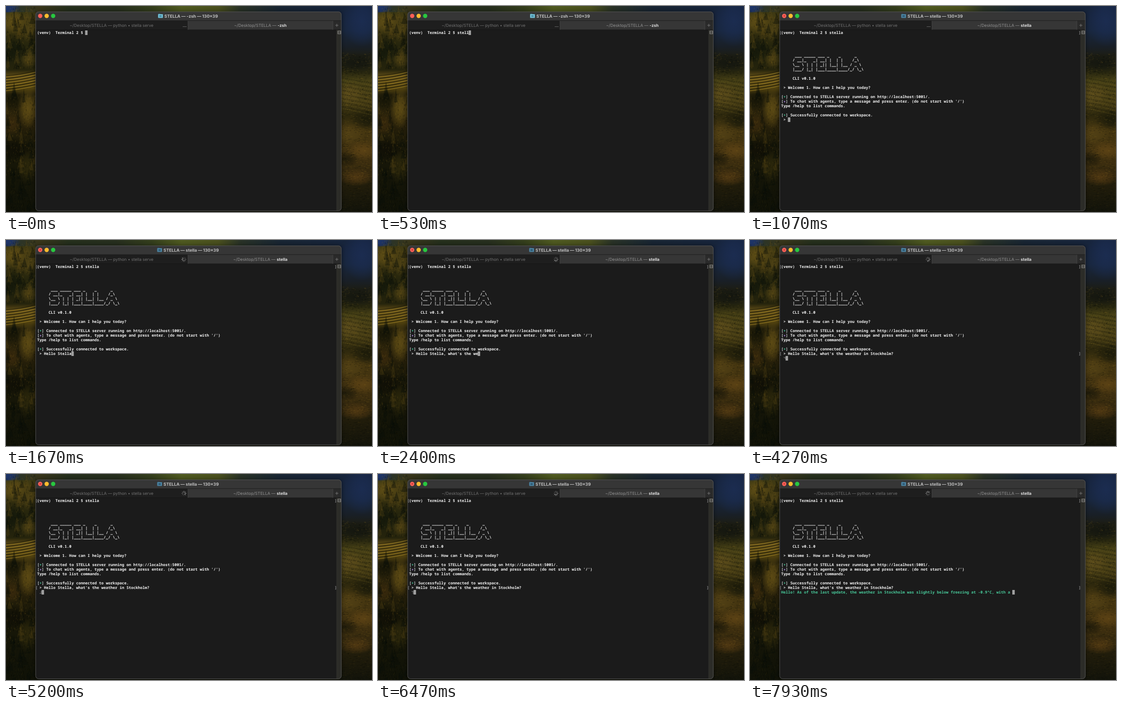
These frames come from a looping animation (720 by 405 pixels, 8000 ms). An HTML page with a canvas:

```html
<!DOCTYPE html>
<html lang="en">
<head>
<meta charset="utf-8">
<title>Terminal session</title>
<style>
html, body { margin: 0; width: 100%; height: 100%; overflow: hidden; background: #1b1b1b; }
canvas { display: block; width: 720px; height: 405px; }
</style>
</head>
<body>
<canvas id="stage"></canvas>
<script>
const W = 720, H = 405, LOOP = 8000;
const COL = 4.505, ROW = 9, LEFT = 61.3, TOP = 48;
const MONO = '600 7.5px "Noto Sans Mono", "DejaVu Sans Mono", monospace';
const UI = 'Inter, Roboto, sans-serif';
const PLAIN = '400 8.1px ' + UI, BOLD = '700 8.1px ' + UI, TITLE = '700 8.3px ' + UI;
const WHITE = '#f4f4f4', GREEN = '#48c99a', DIM = '#8b8b8b';

// Times of the events within one loop, in ms
const TYPE_CMD = 130, RUN = 620, BANNER = 870, BUSY = 1250;
const TYPE_MSG = 1090, SEND = 3700, REPLY = 6880;

const COMMAND = 'stella';
const MESSAGE = "Hello Stella, what's the weather in Stockholm?";
const WORDS = ('Hello! As of the last update, the weather in Stockholm was ' +
  'slightly below freezing at -0.9°C, with a').split(' ');
const LOGO = [
  ' ___ _____ ___ _    _      _',
  '/ __|_   _| __| |  | |    /_\\',
  '\\__ \\ | | | _|| |__| |__ / _ \\',
  '|___/ |_| |___|____|____/_/ \\_\\'
];
const BRAILLE = '⠋⠙⠹⠸⠼⠴⠦⠧⠇⠏';

const dpr = window.devicePixelRatio || 1;

function makeLayer(canvas) {
  canvas.width = W * dpr;
  canvas.height = H * dpr;
  const c = canvas.getContext('2d');
  c.scale(dpr, dpr);
  c.textRendering = 'geometricPrecision';
  return c;
}

const stage = document.getElementById('stage');
const ctx = makeLayer(stage);
const backdrop = document.createElement('canvas');

function box(c, x, y, w, h, fill) {
  c.fillStyle = fill;
  c.fillRect(x, y, w, h);
}

function disc(c, x, y, r, fill) {
  c.fillStyle = fill;
  c.beginPath();
  c.arc(x, y, r, 0, Math.PI * 2);
  c.fill();
}

function line(c, x0, y0, x1, y1) {
  c.beginPath();
  c.moveTo(x0, y0);
  c.lineTo(x1, y1);
  c.stroke();
}

function fade(c, x0, y0, x1, y1, stops) {
  const g = c.createLinearGradient(x0, y0, x1, y1);
  stops.split(' ').forEach(s => {
    const [at, colour] = s.split(':');
    g.addColorStop(at / 100, colour);
  });
  return g;
}

function randomizer(seed) {
  return () => (seed = (seed * 16807) % 2147483647) / 2147483647;
}

function glow(c, x, y, rx, ry, colour) {
  c.save();
  c.translate(x, y);
  c.scale(rx, ry);
  const g = c.createRadialGradient(0, 0, 0, 0, 0, 1);
  g.addColorStop(0, colour);
  g.addColorStop(0.45, colour + 'b0');
  g.addColorStop(1, colour + '00');
  box(c, -1, -1, 2, 2, g);
  c.restore();
}

function conifer(c, x, y, w, h, colour) {
  c.fillStyle = colour;
  c.beginPath();
  c.moveTo(x, y - h);
  c.lineTo(x + w, y);
  c.lineTo(x - w, y);
  c.fill();
}

// Soft dusk hills around the window
function paintHills(c) {
  const rnd = randomizer(4711);
  box(c, 0, 0, 360, H, fade(c, 0, 0, 0, H,
    '0:#2c3014 6:#463c12 14:#302c0e 24:#1d1f0c 31:#26240c 34:#5c4a16 40:#51420f 43:#29230b 56:#29210a 68:#191808 100:#0f1107'));
  box(c, 360, 0, 360, H, fade(c, 0, 0, 0, H,
    '0:#16233d 12:#18263c 20:#191f26 24:#1c1d15 32:#26250f 36:#443e15 47:#463c14 53:#2c270d 60:#453610 76:#3d2e0f 86:#221d0b 100:#12130a'));
  box(c, 0, 0, W, 12, fade(c, 0, 0, W, 0,
    '0:#1b2d58 4:#2c3426 9:#38351a 17:#252f1c 30:#262e1e 40:#343e1c 48:#4f5a20 58:#4a501e 64:#293226 75:#182533 100:#16243f'));

  glow(c, 4, 3, 24, 12, '#1d3468');
  glow(c, 16, 32, 26, 24, '#5f4e16');
  glow(c, 46, 48, 18, 24, '#4c4014');
  glow(c, 10, 84, 26, 28, '#14180a');
  glow(c, 44, 104, 18, 20, '#4d4013');
  glow(c, 12, 186, 26, 20, '#171607');
  glow(c, 43, 202, 20, 40, '#5c4a14');
  glow(c, 10, 232, 20, 22, '#38290c');
  glow(c, 18, 282, 34, 24, '#100f06');
  glow(c, 42, 316, 20, 34, '#2c270b');
  glow(c, 700, 30, 40, 50, '#1b2c50');
  glow(c, 690, 112, 44, 18, '#14160f');
  glow(c, 674, 172, 32, 24, '#58491a');
  glow(c, 712, 224, 34, 22, '#1c1b0a');
  glow(c, 676, 252, 32, 22, '#503f14');
  glow(c, 702, 284, 32, 20, '#5a4114');
  glow(c, 668, 302, 26, 16, '#211c0a');
  glow(c, 690, 336, 36, 18, '#4e3712');

  // Vineyard rows
  c.lineWidth = 1.1;
  for (let i = 0; i < 12; i++) {
    c.strokeStyle = i % 2 ? 'rgba(190,154,48,.6)' : 'rgba(22,20,6,.65)';
    c.beginPath();
    c.moveTo(0, 137 + i * 2.7);
    c.quadraticCurveTo(30, 135 + i * 2.6, 60, 127 + i * 2.7);
    c.stroke();
  }
  c.setLineDash([3, 1.2]);
  for (let i = 0; i < 16; i++) {
    c.strokeStyle = i % 2 ? 'rgba(120,102,36,.38)' : 'rgba(18,20,8,.5)';
    c.beginPath();
    c.moveTo(658, 141 + i * 4);
    c.quadraticCurveTo(690, 147 + i * 4, 722, 152 + i * 4.2);
    c.stroke();
  }
  c.setLineDash([]);

  // Conifers on the left, from far to near
  for (let i = 0; i < 70; i++) {
    const y = i < 28 ? 24 + i * 3.7 : 178 + (i - 28) * 5.8;
    const lit = rnd() < 0.4 && y < 330;
    conifer(c, rnd() * 60, y, 3 + rnd() * 4, 14 + rnd() * 18,
      lit ? 'rgba(88,72,22,.28)' : 'rgba(9,14,7,.38)');
  }

  // Fine foliage: upright on the trees, flat on the fields
  for (let i = 0; i < 2600; i++) {
    const left = rnd() < 0.5, x = (left ? 0 : 659) + rnd() * 60, y = rnd() * H;
    if (left ? y > 124 && y < 170 : y < 92) continue;
    const size = 0.7 + rnd() * 1.5, lit = rnd() < 0.45;
    const alpha = (lit ? 0.24 : 0.3) * (lit && y > 340 ? 0.4 : 1);
    box(c, x, y, left ? 0.9 : size * 1.8, left ? size * 1.8 : 0.9,
      lit ? `rgba(140,108,34,${alpha})` : `rgba(6,8,4,${alpha})`);
  }
}

function paintWindow(c) {
  c.save();
  c.shadowColor = 'rgba(0,0,0,.5)';
  c.shadowBlur = 8;
  c.fillStyle = '#1b1b1b';
  c.beginPath();
  c.roundRect(58, 11, 602, 392, 6);
  c.fill();
  c.shadowBlur = 0;
  c.clip();
  box(c, 58, 11, 602, 18, '#363636');
  box(c, 58, 29, 300, 18, '#1e1e1e');
  box(c, 358, 29, 285, 18, '#363636');
  box(c, 643, 29, 17, 18, '#2a2a2a');
  box(c, 58, 28.5, 602, 0.7, '#151515');
  box(c, 58, 46.5, 602, 0.7, '#111');
  box(c, 357.6, 29, 0.8, 18, '#484848');
  box(c, 642.6, 29, 0.8, 18, '#4a4a4a');
  box(c, 650.5, 47, 9.5, 356, '#2c2c28');
  box(c, 650.5, 47, 0.6, 356, '#393936');
  c.restore();

  c.strokeStyle = '#5c5c5c';
  c.lineWidth = 0.8;
  c.beginPath();
  c.roundRect(58.4, 11.4, 601.2, 391.2, 6);
  c.stroke();

  disc(c, 67.3, 19.5, 4.2, '#ff5f57');
  disc(c, 80, 19.5, 4.2, '#febc2e');
  disc(c, 92.8, 19.5, 4.2, '#28c840');

  c.strokeStyle = '#858585';
  line(c, 647.8, 38, 653.8, 38);
  line(c, 650.8, 35, 650.8, 41);
  c.strokeStyle = '#a5a5a5';
  c.strokeRect(652.9, 49.2, 5.4, 5.6);
  box(c, 653, 51.7, 5.2, 0.7, '#a5a5a5');
}

function widthOf(text, font) {
  ctx.font = font;
  return ctx.measureText(text).width;
}

function label(text, x, y, colour, font) {
  ctx.font = font;
  ctx.fillStyle = colour;
  ctx.fillText(text, x, y);
}

function folder(x, y, colour, shade) {
  box(ctx, x + 0.5, y, 4, 2, shade);
  ctx.fillStyle = colour;
  ctx.beginPath();
  ctx.roundRect(x, y + 0.8, 9.6, 7.4, 1);
  ctx.fill();
  box(ctx, x + 2.6, y + 3, 4.4, 3, shade);
}

function drawChrome(t) {
  const running = t >= RUN;
  const job = running ? 'stella' : '-zsh';
  const title = `STELLA — ${job} — 130×39`;
  const x = 364.2 - widthOf(title, TITLE) / 2;
  label(title, x, 22.5, '#c0c0c0', TITLE);
  if (running) {
    folder(x - 12.4, 15.3, '#4a819f', '#2c566f');
    disc(ctx, 67.3, 19.5, 1.1, '#8a1d18');
  } else {
    folder(x - 12.4, 15.3, '#70bcd2', '#448ba4');
  }

  const first = '~/Desktop/STELLA — python • stella serve';
  label(first, 207.7 - widthOf(first, PLAIN) / 2, 41, '#717171', PLAIN);
  const path = '~/Desktop/STELLA — ';
  const pathWidth = widthOf(path, PLAIN);
  const start = 500.4 - (pathWidth + widthOf(job, BOLD)) / 2;
  label(path, start, 41, '#929292', PLAIN);
  label(job, start + pathWidth, 41, '#dedede', BOLD);

  if (t < BUSY) {
    for (let i = 0; i < 3; i++) disc(ctx, 348.8 + i * 2.6, 40.6, 0.65, '#b4b4b4');
  } else {
    drawBusy(t);
  }
}

function drawBusy(t) {
  const step = Math.floor(t / 125);
  ctx.lineCap = 'round';
  ctx.lineWidth = 1;
  for (let i = 0; i < 8; i++) {
    const a = i * Math.PI / 4, age = ((step - i) % 8 + 8) % 8;
    const dx = Math.cos(a), dy = Math.sin(a);
    ctx.strokeStyle = `rgba(225,225,225,${0.95 - age * 0.1})`;
    line(ctx, 350 + dx * 2.2, 38 + dy * 2.2, 350 + dx * 4.3, 38 + dy * 4.3);
  }
  ctx.lineCap = 'butt';
}

function write(text, col, row, colour = WHITE, drop = 0) {
  ctx.font = MONO;
  ctx.fillStyle = colour;
  [...text].forEach((ch, i) => {
    if (ch !== ' ') ctx.fillText(ch, LEFT + (col + i) * COL, TOP + row * ROW + 7.2 + drop);
  });
}

function cursor(col, row) {
  box(ctx, 61 + col * COL, TOP + row * ROW, COL + 0.3, ROW, '#a0a0a0');
}

function marks(row) {
  write('[', -0.8, row, DIM);
  write(']', 129.9, row, DIM);
}

function note(sign, colour, text, row, drop) {
  write('[ ]', 0, row, '#c3c9c8');
  write(sign, 1, row, colour, drop);
  write(text, 4, row);
}

function typed(text, t, start, pace) {
  return text.slice(0, Math.max(0, Math.floor((t - start) / pace)));
}

function drawBraille(t) {
  const step = Math.floor((t - 5165) / 70.5) + 4;
  const bits = BRAILLE.charCodeAt((step % 10 + 10) % 10) - 0x2800;
  for (let i = 0; i < 6; i++) {
    if (!(bits >> i & 1)) continue;
    disc(ctx, 67.2 + (i > 2 ? 1.9 : 0), 230.8 + (i % 3) * 2, 0.65, '#c9c9c9');
  }
}

function drawBanner() {
  LOGO.forEach((text, i) => write(text, 5, 5 + i));
  write('CLI v0.1.0', 5, 10);
  write('> Welcome 1. How can I help you today?', 1, 12);
  note('+', GREEN, 'Connected to STELLA server running on http://localhost:5001/.', 14);
  note('*', '#b08be0', "To chat with agents, type a message and press enter. (do not start with '/')", 15, 1.3);
  write('Type /help to list commands.', 0, 16);
  note('+', GREEN, 'Successfully connected to workspace.', 18);
}

function drawSession(t) {
  const command = typed(COMMAND, t, TYPE_CMD, 70);
  write('(venv)  Terminal 2 $ ' + command, 0, 0);
  if (t < RUN) return cursor(21 + command.length, 0);
  marks(0);
  if (t < BANNER) return cursor(0, 1);

  drawBanner();
  const message = typed(MESSAGE, t, TYPE_MSG, 48);
  write('> ' + message, 1, 19);
  if (t < SEND) return cursor(3 + message.length, 19);
  marks(19);
  if (t < REPLY) {
    drawBraille(t);
    return cursor(2, 20);
  }

  const count = Math.floor((t - REPLY) / 58);
  const reply = WORDS.slice(0, count).map(w => w + ' ').join('');
  write(reply, 0, 20, GREEN);
  cursor(reply.length, 20);
}

function draw(now) {
  const t = now % LOOP;
  ctx.drawImage(backdrop, 0, 0, W, H);
  drawChrome(t);
  drawSession(t);
}

const back = makeLayer(backdrop);
paintHills(back);
paintWindow(back);

const begin = performance.now();
function tick() {
  draw(performance.now() - begin);
  requestAnimationFrame(tick);
}
tick();
</script>
</body>
</html>
```
